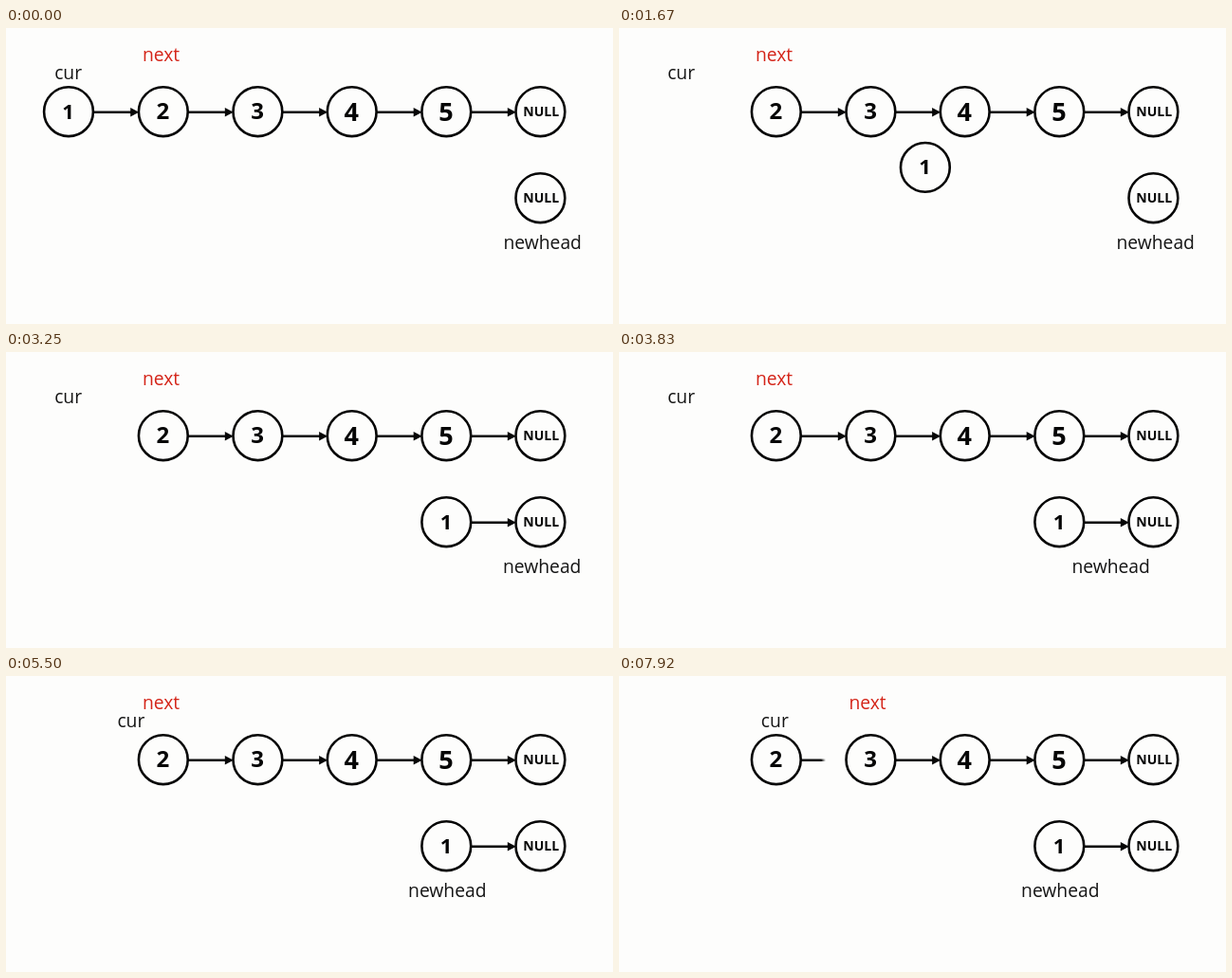
An HTML page that plays this animation: 640 px wide and 312 px high, repeating every 8000 ms.

```html
<!DOCTYPE html>
<html lang="en">
<head>
<meta charset="utf-8">
<title>Reversing a linked list</title>
<style>
  html, body { margin: 0; width: 100%; height: 100%; overflow: hidden; background: #fdfdfc; }
  svg { display: block; width: 100%; height: 100%; }
  text { font-family: "Open Sans", "Noto Sans", sans-serif; text-anchor: middle; }
  .node circle { fill: none; stroke: #060606; stroke-width: 2.6; }
  .node text { font-weight: 700; fill: #060606; }
  .arrow line { stroke: #060606; stroke-width: 2.5; }
  .arrow path { fill: #060606; }
  .label { font-size: 19.3px; fill: #151515; }
  .next { fill: #d42418; }
</style>
</head>
<body>
<svg id="stage" viewBox="0 0 640 312"></svg>
<script>
const NS = "http://www.w3.org/2000/svg";
const stage = document.getElementById("stage");
const LOOP = 8000;
const TOP = 88.2, LOW = 179.2;
const COLS = [66, 165.8, 265.4, 364.7, 464.3, 563.4];

function add(parent, tag, attrs, text) {
  const el = document.createElementNS(NS, tag);
  for (const key in attrs) el.setAttribute(key, attrs[key]);
  if (text) el.textContent = text;
  parent.appendChild(el);
  return el;
}

function place(el, x, y) {
  el.setAttribute("transform", `translate(${x.toFixed(2)} ${y.toFixed(2)})`);
}

function addNode(name, size, x, y, dx = -0.4) {
  const g = add(stage, "g", { class: "node" });
  add(g, "circle", { r: 25.9 });
  add(g, "text", { x: dx, y: size * 0.345, "font-size": size }, name);
  place(g, x, y);
  return g;
}

// Arrow leaving column i; returns a setter for the share that is visible from the left.
function addArrow(i, y) {
  const x1 = COLS[i] + 26, x2 = COLS[i + 1] - 25.6, cy = y + 0.5;
  const g = add(stage, "g", { class: "arrow" });
  add(g, "line", { x1, y1: cy, x2: x2 - 7, y2: cy });
  add(g, "path", { d: `M${x2} ${cy}l-9 -4.7v9.4z` });

  const id = `wipe${i}-${Math.round(y)}`;
  const fade = add(stage, "linearGradient", { id: id + "g", gradientUnits: "userSpaceOnUse", y1: 0, y2: 0 });
  add(fade, "stop", { offset: 0, "stop-color": "#fff" });
  add(fade, "stop", { offset: 1, "stop-color": "#000" });
  const mask = add(stage, "mask", { id, maskUnits: "userSpaceOnUse", x: x1 - 5, y: y - 12, width: 60, height: 24 });
  add(mask, "rect", { x: x1 - 5, y: y - 12, width: 60, height: 24, fill: `url(#${id}g)` });

  return share => {
    const edge = x1 + (x2 - x1) * share;
    fade.setAttribute("x1", edge - 3);
    fade.setAttribute("x2", edge + 2);
    g.style.display = share > 0 ? "" : "none";
    if (share < 1) g.setAttribute("mask", `url(#${id})`);
    else g.removeAttribute("mask");
  };
}

function addLabel(name, cls) {
  return add(stage, "text", { class: "label " + cls }, name);
}

const arrows = [0, 1, 2, 3, 4].map(i => addArrow(i, TOP));
const newArrow = addArrow(4, LOW);

const sizes = [22, 24, 24, 27, 27];
const nodes = sizes.map((size, i) => addNode(String(i + 1), size, COLS[i], TOP));
addNode("NULL", 14, COLS[5], TOP, 0.8);
addNode("NULL", 14, COLS[5], LOW, 0.8);

const cur = addLabel("cur", "");
const next = addLabel("next", "next");
const newhead = addLabel("newhead", "");

const span = (t, start, length) => Math.min(1, Math.max(0, (t - start) / length));
const ease = u => u < 0.5 ? 2 * u * u : 1 - 2 * (1 - u) * (1 - u);
const move = (t, start, length) => ease(span(t, start, length));

function draw(t) {
  arrows[0](1 - span(t, 40, 445));

  const m = move(t, 641, 1780);
  place(nodes[0], COLS[0] + (COLS[4] - COLS[0]) * m, TOP + (LOW - TOP) * m);

  newArrow(span(t, 2540, 445));
  place(newhead, 565.7 - 100.4 * move(t, 3185, 1335), 233);
  place(cur, 65.6 + 98.7 * move(t, 4707, 1335), 54);
  place(next, 163.5 + 98.5 * move(t, 6189, 1335), 35);
  arrows[1](1 - span(t, 7700, 445));
}

const begin = performance.now();
function tick() {
  draw((performance.now() - begin) % LOOP);
  requestAnimationFrame(tick);
}
draw(0);
requestAnimationFrame(tick);
</script>
</body>
</html>
```
